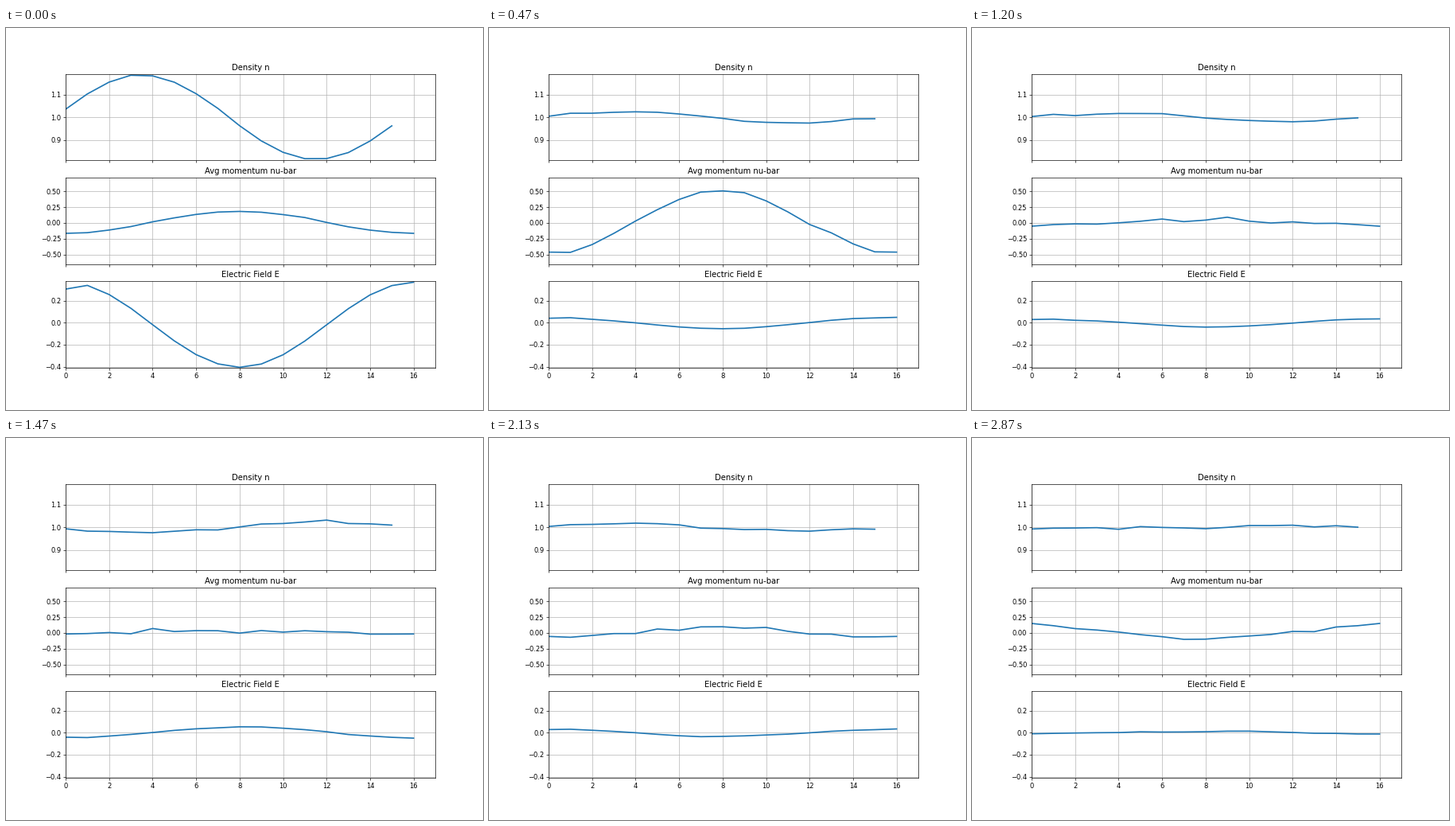
These frames come from a looping animation (600 by 480 pixels, 2.94 s). A matplotlib script:

```python
import numpy as np
import matplotlib.pyplot as plt
from matplotlib.animation import FuncAnimation

LOOP_MS, TICK_MS = 2940, 20
STEPS = 44  # simulation states shown per loop
CELLS = 16
DX = 4 * np.pi / CELLS
E_AMP, U_AMP, N_AMP = 0.385, 0.75, 0.187

node = np.arange(CELLS + 1)
cos_mode = np.cos(2 * np.pi * node / CELLS)
sin_mode = np.sin(2 * np.pi * (node[:-1] + 0.5) / CELLS)

# Damped standing wave: phase and amplitude at a few steps
key_step = [0, 7, 13, 18, 27, 37, 43]
key_phase = [-0.23, 4.94, 8.22, 12.05, 20.72, 29.57, 33.14]
key_amp = [1.03, 0.68, 0.30, 0.114, 0.138, 0.122, 0.151]


def state(step):
    """Density, momentum and field on the grid at one step."""
    amp = np.exp(np.interp(step, key_step, np.log(key_amp)))
    phase = np.interp(step, key_step, key_phase)
    swing, drift = amp * np.cos(phase), amp * np.sin(phase)

    # Particle noise builds up as the wave loses its order
    rng = np.random.default_rng(40 + step)
    level = 1 - 0.7 * np.exp(-step / 6)
    noise_n = level * rng.normal(0, 0.005, CELLS)
    noise_n -= noise_n.mean()
    noise_u = level * rng.normal(0, 0.02, CELLS)

    n = 1 + N_AMP * swing * sin_mode + noise_n
    u = U_AMP * drift * cos_mode[:-1] + 0.01 + noise_u

    ripple = -DX * np.append(0, np.cumsum(noise_n))
    e = E_AMP * swing * (cos_mode - 0.05) + ripple - ripple.mean()
    e[0] = 0.83 * e[-1]
    return n, np.append(u, u[0]), e


states = [state(step) for step in range(STEPS)]

fig, axes = plt.subplots(3, 1, sharex=True, figsize=(10, 8), dpi=60)
panels = [
    ("Density n", (0.8095, 1.192), [0.9, 1.0, 1.1]),
    ("Avg momentum nu-bar", (-0.6526, 0.718), [-0.5, -0.25, 0, 0.25, 0.5]),
    ("Electric Field E", (-0.412, 0.3735), [-0.4, -0.2, 0, 0.2]),
]
lines = []
for ax, (title, limits, ticks) in zip(axes, panels):
    ax.set_title(title)
    ax.set_xlim(0, 17)
    ax.set_xticks(range(0, 17, 2))
    ax.set_yticks(ticks)
    ax.set_ylim(*limits)
    ax.grid()
    lines += ax.plot([], [], color="tab:blue", linewidth=2)


def update(tick):
    # Sampling late in the tick keeps each change from lagging
    step = int((tick + 0.75) * TICK_MS * STEPS / LOOP_MS)
    for line, values in zip(lines, states[step]):
        line.set_data(np.arange(len(values)), values)
    return lines


anim = FuncAnimation(fig, update, frames=LOOP_MS // TICK_MS, interval=TICK_MS,
                     repeat=True, repeat_delay=0)
plt.show()
```
